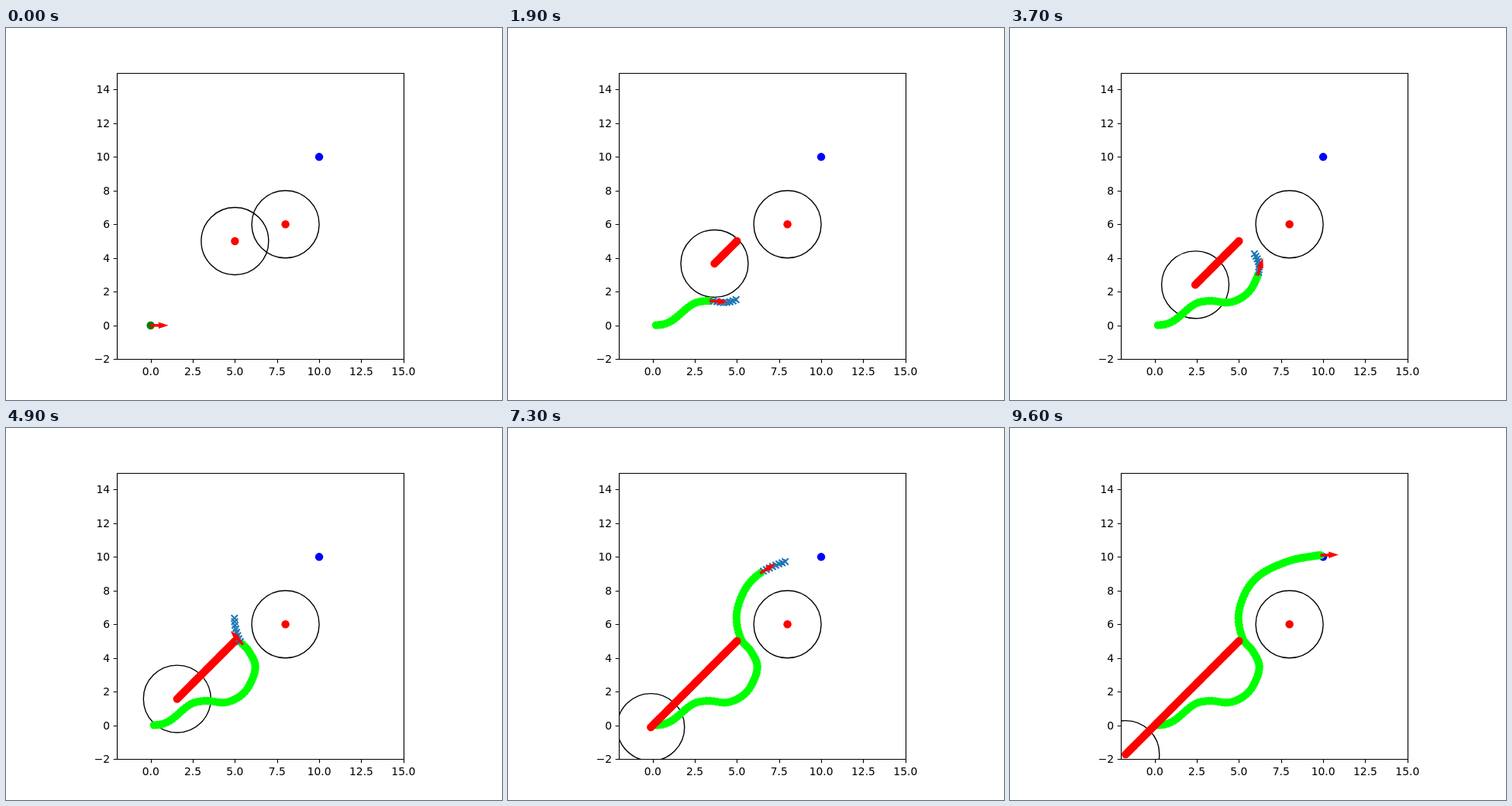
An HTML page for the animation above (9.7 s loop, 640 px wide and 480 px high).

```html
<!DOCTYPE html>
<html lang="en">
<head>
<meta charset="utf-8">
<title>Path planning plot</title>
<style>
  html, body { margin: 0; width: 100%; height: 100%; overflow: hidden; background: #fff; }
  svg { display: block; width: 640px; height: 480px; }
  text { font: 13.89px "DejaVu Sans", sans-serif; }
  path, circle { fill: none; }
  .ring { stroke: #000; stroke-width: 1.39; }
  .dots { stroke-width: 10.42; stroke-linecap: round; }
  .axes { stroke: #000; stroke-width: 1.11; }
  .plan { stroke: #1f77b4; stroke-width: 2.08; }
  .arrow { fill: #f00; stroke: #f00; stroke-width: 1.39; }
</style>
</head>
<body>
<svg viewBox="0 0 640 480">
  <defs><clipPath id="box"><rect x="143.2" y="57.6" width="369.6" height="369.6"/></clipPath></defs>
  <g id="plot" clip-path="url(#box)"></g>
  <g id="frame"></g>
</svg>
<script>
const STEP = 100, STEPS = 97, HORIZON = 8;
const UNIT = 369.6 / 17;
const px = x => 143.2 + (x + 2) * UNIT;
const py = y => 427.2 - (y + 2) * UNIT;
const snap = v => Math.floor(v + 0.5) + 0.5;

// Turning points of the robot's route: step, x, y in plot units
const route = [
  [0, 0, 0], [3.5, 0.68, 0.08], [6.4, 1.21, 0.33], [14, 2.41, 1.28],
  [18.5, 3.3, 1.46], [24, 4.4, 1.36], [29, 5.28, 1.72], [33, 5.83, 2.33],
  [40, 6.21, 3.48], [46, 5.83, 4.4], [51, 5.23, 5.14], [58, 4.98, 6.56],
  [66, 5.49, 8.08], [73, 6.41, 9.05], [82, 8.04, 9.78], [90, 9.35, 10.04],
  [96, 9.86, 10.1], [104, 10.05, 10.07]
];

function slope(i, c) {
  const a = route[Math.max(i - 1, 0)], b = route[Math.min(i + 1, route.length - 1)];
  return (b[c] - a[c]) / (b[0] - a[0]);
}

// Smooth curve through the turning points
function robot(step) {
  let i = 0;
  while (i < route.length - 2 && route[i + 1][0] <= step) i++;
  const a = route[i], b = route[i + 1], span = b[0] - a[0];
  const u = (step - a[0]) / span, v = 1 - u;
  const [x, y] = [1, 2].map(c =>
    v * v * (1 + 2 * u) * a[c] + u * v * v * span * slope(i, c) +
    u * u * (3 - 2 * u) * b[c] - u * u * v * span * slope(i + 1, c));
  return [px(x), py(y)];
}

const obstacle = step => [px(5 - 0.07 * step), py(5 - 0.07 * step)];

function add(parent, tag, attrs, text) {
  const el = document.createElementNS("http://www.w3.org/2000/svg", tag);
  for (const k in attrs) el.setAttribute(k, attrs[k]);
  if (text) el.textContent = text;
  return document.getElementById(parent).appendChild(el);
}

const at = (x, y) => `M${x.toFixed(2)} ${y.toFixed(2)}`;
const dot = ([x, y]) => at(x, y) + "h0";
const cross = ([x, y]) => at(x - 4.17, y - 4.17) + "l8.33 8.33m0-8.33l-8.33 8.33";
const dots = (color, d = "") => add("plot", "path", { class: "dots", stroke: color, d });
const ring = (cx, cy) => add("plot", "circle", { class: "ring", cx, cy, r: 2 * UNIT });

function marks(from, to, mark) {
  let d = "";
  for (let i = from; i <= to; i++) d += mark(i);
  return d;
}

ring(px(8), py(6));
const moving = ring(px(5), py(5));
dots("#00f", dot([px(10), py(10)]));
const start = dots("#008000", dot([px(0), py(0)]));
const trail = dots("#0f0");
dots("#f00", dot([px(8), py(6)]));
const wake = dots("#f00");
const plan = add("plot", "path", { class: "plan" });
const arrow = add("plot", "path", {
  class: "arrow",
  d: "M0-1.09H10.87V-3.26L20.65 0L10.87 3.26V1.09H0Z"
});

const [left, right, upper, lower] = [143.2, 512.8, 57.6, 427.2].map(snap);
let lines = `M${left} ${upper}H${right}V${lower}H${left}Z`;
for (let v = 0; v <= 15; v += 2.5) {
  lines += `M${snap(px(v))} ${lower}v4.86`;
  add("frame", "text", { x: px(v), y: 448, "text-anchor": "middle" }, v.toFixed(1));
}
for (let v = -2; v <= 14; v += 2) {
  lines += `M${left} ${snap(py(v))}h-4.86`;
  add("frame", "text", { x: 134.2, y: Math.round(py(v) + 5.1), "text-anchor": "end" },
    String(v).replace("-", "\u2212"));
}
add("frame", "path", { class: "axes", d: lines });

function draw(k) {
  const here = robot(k), ahead = robot(k + 0.5), [ox, oy] = obstacle(k);
  const angle = k && Math.atan2(ahead[1] - here[1], ahead[0] - here[0]) * 180 / Math.PI;
  const planEnd = k && Math.min(k + HORIZON, STEPS - 1);
  start.style.display = k ? "none" : "";
  moving.setAttribute("cx", ox);
  moving.setAttribute("cy", oy);
  trail.setAttribute("d", marks(1, k, i => dot(robot(i))));
  wake.setAttribute("d", marks(0, k, i => dot(obstacle(i))));
  plan.setAttribute("d", marks(k + 1, planEnd, i => cross(robot(i))));
  arrow.setAttribute("transform", `translate(${here}) rotate(${angle})`);
}

let shown = 0;
const origin = performance.now();
function tick(now) {
  const k = Math.floor(Math.max(0, now - origin) / STEP) % STEPS;
  if (k !== shown) draw(shown = k);
  requestAnimationFrame(tick);
}
draw(0);
requestAnimationFrame(tick);
</script>
</body>
</html>
```
